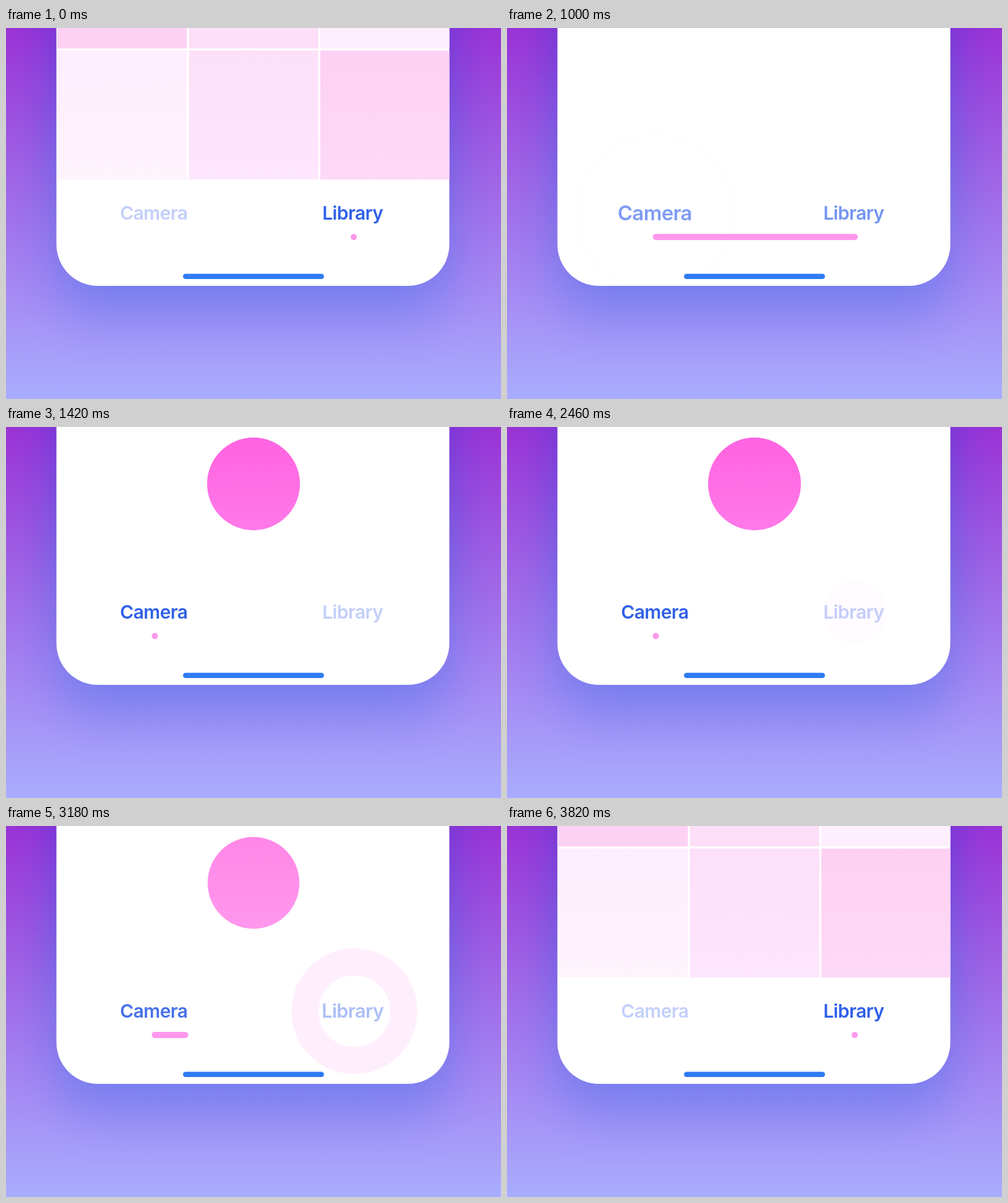
An HTML page that plays this animation: 800x600 px, repeating every 4.98 s.

```html
<!DOCTYPE html>
<html lang="en">
<head>
<meta charset="utf-8">
<style>
  html, body { margin: 0; width: 100%; height: 100%; overflow: hidden; }
  svg { display: block; }
  text { font: 600 30px Inter, sans-serif; letter-spacing: -.6px; text-anchor: middle; }
</style>
</head>
<body>
<svg width="800" height="600" viewBox="0 0 800 600">
  <defs>
    <linearGradient id="sky" x2="0" y2="1">
      <stop stop-color="#9b33d6"/><stop offset="1" stop-color="#a9adff"/>
    </linearGradient>
    <linearGradient id="shade" x2="0" y2="1">
      <stop offset=".17" stop-color="#552dd0"/>
      <stop offset=".6" stop-color="#4a64e1"/>
      <stop offset="1" stop-color="#7082f0"/>
    </linearGradient>
    <linearGradient id="pink" x2="0" y2="1">
      <stop stop-color="#ff63e0"/><stop offset="1" stop-color="#ff79e8"/>
    </linearGradient>
    <linearGradient id="pale" x2="0" y2="1">
      <stop stop-color="#fdeefe"/><stop offset="1" stop-color="#fef4fc"/>
    </linearGradient>
    <linearGradient id="soft" x2="0" y2="1">
      <stop stop-color="#fce0f8"/><stop offset="1" stop-color="#fee6fc"/>
    </linearGradient>
    <linearGradient id="rose" x2="0" y2="1">
      <stop stop-color="#fdd0f3"/><stop offset="1" stop-color="#fdd9f7"/>
    </linearGradient>
    <filter id="blur" x="-50%" y="-50%" width="200%" height="200%" color-interpolation-filters="sRGB">
      <feGaussianBlur stdDeviation="40"/>
    </filter>
    <clipPath id="screen"><rect x="81.5" y="-200" width="635" height="617" rx="67"/></clipPath>
  </defs>

  <rect width="800" height="600" fill="url(#sky)"/>
  <rect x="81.5" y="-200" width="635" height="663" rx="67" fill="url(#shade)" opacity=".8" filter="url(#blur)"/>

  <g clip-path="url(#screen)">
    <rect width="800" height="600" fill="#fff"/>
    <g id="grid">
      <rect x="83" y="-10" width="209.3" height="43" fill="#fdd1f4"/>
      <rect x="295.5" y="-10" width="209.3" height="43" fill="#fddff8"/>
      <rect x="508" y="-10" width="209.3" height="43" fill="#fdeffe"/>
      <rect x="83" y="36.5" width="209.3" height="208.5" fill="url(#pale)"/>
      <rect x="295.5" y="36.5" width="209.3" height="208.5" fill="url(#soft)"/>
      <rect x="508" y="36.5" width="209.3" height="208.5" fill="url(#rose)"/>
    </g>
    <circle id="shutter" cx="400" cy="92" r="75" fill="url(#pink)"/>
    <text id="camera" y="10.5">Camera</text>
    <text id="library" y="10.5">Library</text>
    <rect id="dot" y="333" height="10" rx="5" fill="#fd98ec"/>
    <rect x="286" y="397.5" width="228" height="8.5" rx="4.25" fill="#2f7bf2"/>
    <circle id="touch" cy="299.5" fill="none" stroke="#fc6de4"/>
  </g>
</svg>
<script>
const LOOP = 4980, HALF = 2400, TAP = 545;
const el = id => document.getElementById(id);
const set = (node, attrs) => { for (const k in attrs) node.setAttribute(k, attrs[k]); };
const mix = (a, b, p) => a + (b - a) * p;
const span = (t, start, length) => Math.min(1, Math.max(0, (t - start) / length));
const inOut = (p, n) => p < .5 ? (2 * p) ** n / 2 : 1 - (2 - 2 * p) ** n / 2;

const tabs = [
  { label: el('camera'), x: 238.8, dot: 240.5, touch: 240 },
  { label: el('library'), x: 560.3, dot: 562, touch: 563 }
];
const grid = el('grid'), shutter = el('shutter'), dot = el('dot'), touch = el('touch');

function drawLabel(tab, active, scale) {
  const color = [[194, 47], [207, 96], [250, 232]].map(([off, on]) => Math.round(mix(off, on, active)));
  set(tab.label, { fill: `rgb(${color})`, transform: `translate(${tab.x} 299.5) scale(${scale})` });
}

function drawTouch(x, t, tapped) {
  const p = span(tapped, 0, 430);
  const outer = mix(51, 130, Math.sin(p * Math.PI / 2)), inner = Math.min(outer, 130 * p);
  const press = 1 - (1 - span(t, 45, 350)) ** 3;
  set(touch, { cx: x, r: (outer + inner) / 2, 'stroke-width': outer - inner, opacity: .2 * press * (1 - p) });
}

function draw(time) {
  const toCamera = time < HALF;
  const t = toCamera ? time : time - HALF;
  const u = t - TAP - 45;
  const [to, from] = toCamera ? tabs : [tabs[1], tabs[0]];

  // The pressed label swells while the two labels trade colour
  const swap = span(u, 90, 690);
  drawLabel(from, 1 - swap, 1);
  drawLabel(to, swap, 1 + .1 * Math.sin(Math.PI * swap) ** 2);

  // One end of the dot runs ahead, the other catches up
  const head = mix(from.dot, to.dot, inOut(span(u, 90, 300), 3));
  const tail = mix(from.dot, to.dot, inOut(span(u, 440, 390), 3));
  set(dot, { x: Math.min(head, tail) - 5, width: Math.abs(head - tail) + 10 });

  const leaving = 1 - inOut(span(u, 90, 300), 2);
  const coming = inOut(span(u, 520, 310), 2);
  const shown = toCamera ? coming : leaving;
  set(grid, { opacity: toCamera ? leaving : coming });
  set(shutter, { opacity: shown, r: 75 * mix(.95, 1, shown) });

  drawTouch(to.touch, t, u);
}

const start = performance.now();
function tick() {
  draw((performance.now() - start) % LOOP);
  requestAnimationFrame(tick);
}
tick();
</script>
</body>
</html>
```
